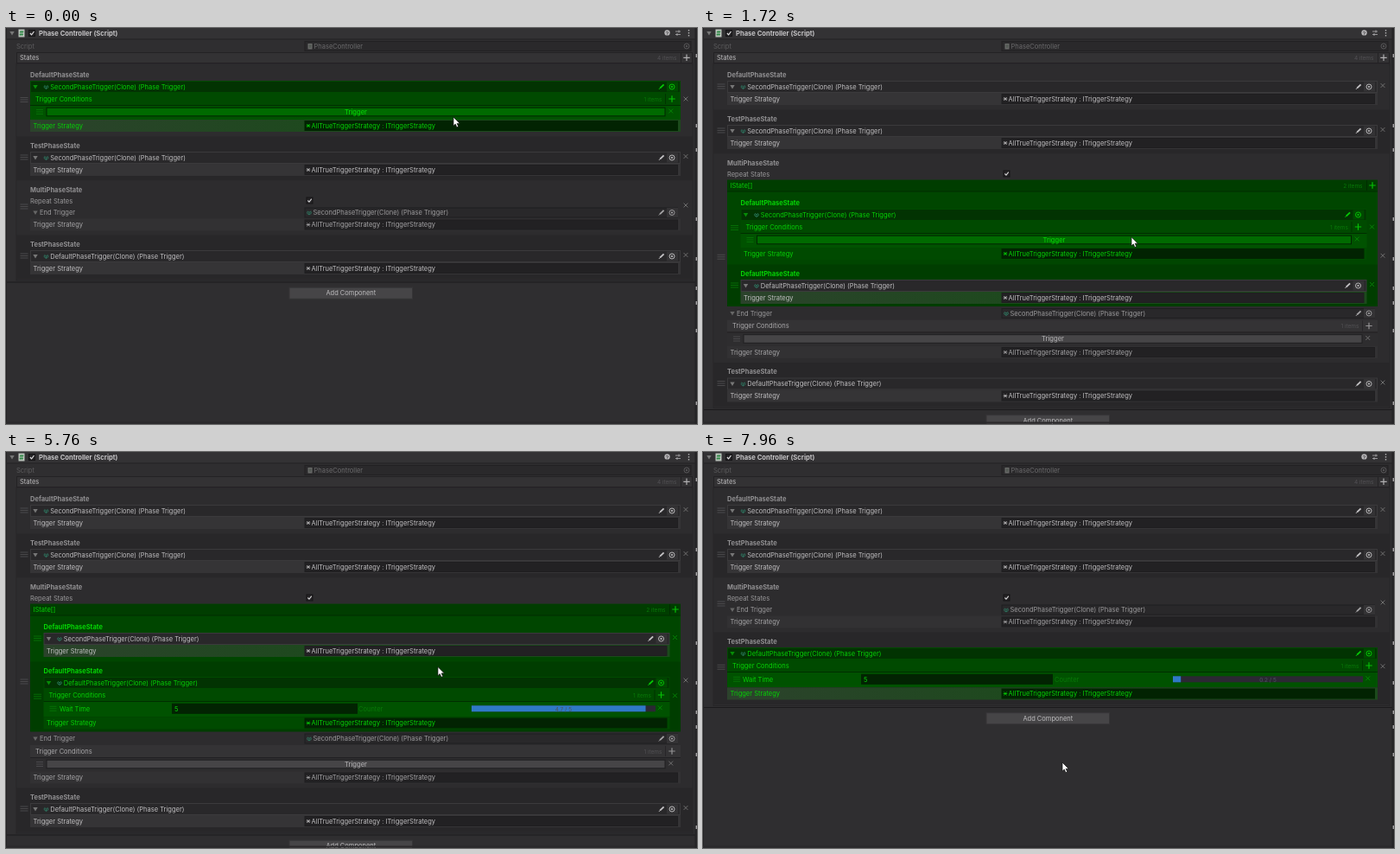
Recreate the animation shown at these times as an HTML page. Size 800 by 458 pixels, loop 8 s.

```html
<!DOCTYPE html>
<html lang="en">
<head>
<meta charset="utf-8">
<title>Phase Controller</title>
<style>
  html, body { margin: 0; width: 100%; height: 100%; overflow: hidden; background: #2f2e30; }
  #stage { display: block; width: 100vw; height: 100vh; }
  text { font-family: Inter, Roboto, sans-serif; font-size: 7.5px; }
</style>
</head>
<body>
<svg id="stage" viewBox="0 0 800 458"></svg>
<script>
const LOOP = 8000, STEP = 40, FADE = 100;
// Moments at which the running phase changes
const AT = { test: 400, multi: 1189, second: 2035, again: 5965, third: 6627, last: 7795 };
const RATE = 1.27;        // counter seconds per second
const TRIGGER = 31, WAIT = 32.5, LIST_PAD = 14.5;

const PLAIN = {
  text: '#c0bfc1', soft: '#9a999b', title: '#929193', dim: '#525154', row: '#29282a', rim: '#3b3a3c', edge: '#1f1e20',
  head: '#343335', list: '#2e2d2f', button: '#464547', field: '#222123', icon: '#c4c3c5', plus: '#949395', mark: '#777'
};
const GREEN = {
  text: '#06d006', soft: '#05b805', title: '#05d405', dim: '#087808', row: '#023302', rim: '#004a00', edge: '#012401',
  head: '#004a00', list: '#005200', button: '#006a00', field: '#022302', icon: '#06c806', plus: '#06c006', mark: '#078c07'
};

const clamp = v => Math.max(0, Math.min(1, v));
const ramp = (t, from) => clamp((t - from) / FADE);
const pulse = (t, on, off) => ramp(t, on) - ramp(t, off);

const rect = (x, y, w, h, fill, extra = '') =>
  `<rect x="${x}" y="${y}" width="${w}" height="${h}" fill="${fill}" ${extra}/>`;
const path = (d, stroke, width = 1, extra = 'fill="none"') =>
  `<path d="${d}" stroke="${stroke}" stroke-width="${width}" ${extra}/>`;
const text = (x, y, s, fill, extra = '') =>
  `<text x="${x}" y="${y + 2.9}" fill="${fill}" ${extra}>${s}</text>`;
const bold = (x, y, s, fill, extra = '') => text(x, y, s, fill, 'font-weight="700" ' + extra);
const small = (x, y, s, fill, anchor = 'end') =>
  text(x, y - .4, s, fill, `text-anchor="${anchor}" style="font-size:6.5px"`);
const clip = (y, h, body) => h <= 0 ? '' :
  `<svg x="0" y="${y}" width="800" height="${h}" viewBox="0 ${y} 800 ${h}">${body}</svg>`;
const box = (x, y, w, h, fill, edge) =>
  rect(x + .5, y + .5, w - 1, h - 1, fill, `stroke="${edge}" stroke-width="1"`);

const plus = (x, y, c) => path(`M${x - 3.7} ${y}h7.4M${x} ${y - 3.7}v7.4`, c, 1.2);
const cross = (x, y, c, r = 2.4) =>
  path(`M${x - r} ${y - r}l${2 * r} ${2 * r}m0 ${-2 * r}l${-2 * r} ${2 * r}`, c, .9);
const handle = (x, y, c, w = 9) => path(`M${x} ${y - 2.5}h${w}m${-w} 2.5h${w}m${-w} 2.5h${w}`, c, .8);
const fold = (x, y, c) => `<path d="M${x - 2.7} ${y - 2}h5.4l-2.7 4.4z" fill="${c}"/>`;
const star = (x, y, c) => path(`M${x - 2.3} ${y}h4.6M${x - 1.6} ${y - 2}l3.2 4M${x + 1.6} ${y - 2}l-3.2 4`, c, .8);
const gem = (x, y) => path(`M${x - 2} ${y - 1.6}l2 1.4l2 -1.4M${x} ${y - .2}v2.6M${x - 2.2} ${y - 1}v2l2.2 1.4l2.2 -1.4v-2`, '#2f8068', .8);
const pencil = (x, y, c) => path(`M${x - 1.9} ${y + 1.6}L${x + 2.6} ${y - 2.6}`, c, 1.9) +
  path(`M${x - 3.2} ${y + 3}l1.5 -1.5`, c, .9);
const target = (x, y, c) => `<circle cx="${x}" cy="${y}" r="3" fill="none" stroke="${c}" stroke-width=".9"/>` +
  `<circle cx="${x}" cy="${y}" r="1.1" fill="${c}"/>`;

const tools = (y, p, e) => rect(765 - e, y - 5.5, 13, 11, p.head) + pencil(759 - e, y, p.icon) + target(771 - e, y, p.icon);

function strategy(y, p, e, d, fill, label = p.text) {
  return rect(28 + d, y - 7, 753 - d - e, 14, fill) + text(31.5 + d, y, 'Trigger Strategy', label) +
    box(345.5, y - 6, 432.5 - e, 12, p.field, p.edge) + star(350, y, label) +
    text(353.5, y, 'AllTrueTriggerStrategy : ITriggerStrategy', label);
}

function waitRow(y, p, nested, time) {
  const [x1, x2, label, b1, b2] = nested ? [192, 407, 408, 539, 752] : [183, 405, 407, 544, 764];
  const v = Math.max(0, Math.min(5, time));
  return text(nested ? 62 : 46, y, 'Wait Time', p.text) + box(x1, y - 6, x2 - x1, 12, p.field, p.edge) +
    text(x1 + 3, y, '5', p.text) + text(label, y, 'Counter', p.dim) +
    rect(b1, y - 3.5, b2 - b1, 7, '#2b2833') + rect(b1, y - 3.5, (b2 - b1) * v / 5, 7, '#2f79c6') +
    small((b1 + b2) / 2, y + .4, v.toFixed(1) + ' / 5', '#4c5460', 'middle');
}

// Folding list of conditions; open runs from 0 to 1
function conditions(y, p, nested, open, time) {
  if (open <= 0) return '';
  const d = nested ? 15.5 : 0, e = nested ? 12.5 : 0, timed = time !== null;
  const size = timed ? WAIT : TRIGGER, w = 753 - d - e, mid = y + (timed ? 15.8 : 15);
  let s = rect(28 + d, y - 7, w, 14, p.head) + text(34 + d, y, 'Trigger Conditions', p.text) +
    small(759.5 - e, y, '1 items', p.dim) + path(`M${763.5 - e} ${y - 6}v12`, p.edge, .6) + plus(771 - e, y, p.plus) +
    rect(28 + d, y + 7, w, size - 14, p.list) + path(`M${28 + d} ${y + 7.5}h${w}`, p.edge, .8) +
    handle(35 + d, mid, p.dim, 8) + cross(769.7 - e, mid - 1, p.mark);
  s += timed ? waitRow(mid, p, nested, time)
    : box(46.5 + d, mid - 5.3, 717 - d - e, 10.6, p.button, p.edge) +
      text(405 + (d - e) / 2, mid, 'Trigger', p.text, 'text-anchor="middle" font-weight="500"');
  return clip(y - 7, size * open, `<g opacity="${nested ? 1 : open}">${s}</g>`);
}

const simpleHeight = s => 51 + s.open * (s.time === null ? TRIGGER : WAIT);

// One phase with a title, an object row, conditions and a strategy row
function simple(y, s) {
  const { name, ref, pal, nested, open, time, titlePal, band } = s;
  const d = nested ? 15.5 : 0, e = nested ? 12.5 : 0, h = simpleHeight(s), mid = y - 12 + h / 2;
  return bold(28 + d, y, name, titlePal.title) + handle(16.5 + d, mid, titlePal.dim) +
    cross(787 - e, mid - 1, titlePal.mark) +
    box(28 + d, y + 7, 753 - d - e, 14, pal.row, pal.rim) + fold(34 + d, y + 14, pal.mark) + gem(46.5 + d, y + 14) +
    text(51.3 + d, y + 14, ref + 'PhaseTrigger(Clone) (Phase Trigger)', pal.text) + tools(y + 14, pal, e) +
    conditions(y + 28, pal, nested, open, time) + strategy(y + h - 23, pal, e, d, band);
}

function multi(y, s) {
  const { open, pal, inner } = s, [a, b] = inner, ha = simpleHeight(a), hb = simpleHeight(b);
  const full = LIST_PAD + ha + hb, list = full * open, rows = TRIGGER * open, lit = pal === GREEN;
  const mid = y - 12 + (63 + list + rows) / 2, p = PLAIN, end = y + 26.5 + list, top = y + 19.5;
  const body = rect(28, top, 753, full - 1.5, lit ? '#004600' : p.list) +
    rect(28, y + 35.5 + ha, 753, hb, lit ? '#003d00' : '#2a292b') +
    rect(28, top, 753, 13, lit ? '#003d00' : p.head) + text(31.5, y + 26, 'IState[]', pal.text) +
    small(763.5, y + 26, '2 items', pal.dim) + path(`M768.5 ${y + 20}v12`, pal.edge, .6) + plus(775, y + 26, pal.plus) +
    path(`M28 ${y + 33}h753`, pal.edge, .8) + simple(y + 46, a) + simple(y + 46 + ha, b);
  return bold(28, y, 'MultiPhaseState', p.title) + handle(16.5, mid, p.dim) + cross(787, mid - 1.5, p.mark) +
    text(28, y + 12.7, 'Repeat States', p.soft) + box(347.5, y + 8.5, 8, 8, '#242325', '#161517') +
    path(`M349.4 ${y + 12.5}l1.6 1.7l2.8 -3.6`, '#d0cfd1', 1.1) +
    clip(top, Math.max(0, list - 1), body) +
    fold(34, end, '#666') + text(39, end, 'End Trigger', p.soft) +
    box(345.5, end - 6, 432.5, 12, '#29282a', p.edge) + gem(351, end) +
    text(355.5, end, 'SecondPhaseTrigger(Clone) (Phase Trigger)', p.soft) + tools(end, { ...p, icon: '#a4a3a5' }, 0) +
    conditions(end + 14.5, { ...p, text: '#a8a7a9' }, false, open, null) +
    strategy(end + 14 + rows, p, 0, 0, '#323133', '#a5a4a6');
}

function states(t) {
  const active = t < AT.test ? 0 : t < AT.multi ? 1 : t < AT.last ? 2 : 3;
  const second = pulse(t, AT.second, AT.again) + ramp(t, AT.third);
  const run = t >= AT.third || (t >= AT.second && t < AT.again) ? 1 : 0;
  const since = t >= AT.third ? AT.third : AT.second;
  const live = active === 2 ? GREEN : PLAIN;
  const outer = (i, name, ref, open, time = null) => ({
    name, ref, open, time, nested: false, pal: active === i ? GREEN : PLAIN, titlePal: PLAIN,
    band: active === i ? 'url(#glow)' : '#353436'
  });
  const nested = (i, ref, open, time) => ({
    name: 'DefaultPhaseState', ref, open, time, nested: true, titlePal: live, pal: run === i ? live : PLAIN,
    band: live === PLAIN ? '#353436' : run === i ? '#004a00' : 'url(#glow)'
  });
  return [
    outer(0, 'DefaultPhaseState', 'Second', 1 - ramp(t, AT.test)),
    outer(1, 'TestPhaseState', 'Second', pulse(t, AT.test, AT.multi)),
    { open: pulse(t, AT.multi, AT.last), pal: live,
      inner: [nested(0, 'Second', 1 - second, null), nested(1, 'Default', second, (t - since) / 1000 * RATE)] },
    outer(3, 'TestPhaseState', 'Default', ramp(t, AT.last), (t - AT.last) / 1000 * RATE)
  ];
}

const height = s => s.inner
  ? 63 + s.open * (LIST_PAD + TRIGGER + simpleHeight(s.inner[0]) + simpleHeight(s.inner[1])) : simpleHeight(s);
const total = list => list.reduce((sum, s) => sum + height(s), 0);

function header() {
  const p = PLAIN;
  return rect(0, 0, 800, 12.5, '#333234') + path('M0 13h800', '#242325') + fold(7, 6, '#777') +
    rect(14.5, 1.5, 7, 9, '#b9c2ba') + bold(15.6, 6, '#', '#23843c') +
    box(26, 2, 8, 8, '#232224', '#161517') + path('M27.9 6l1.7 1.8l2.9 -3.8', '#dddcde', 1.2) +
    bold(38, 6, 'Phase Controller (Script)', '#c6c5c7', 'style="font-size:7.6px"') +
    '<circle cx="765.5" cy="5.5" r="3.2" fill="#b5b4b6"/>' + small(765.5, 6, '?', '#29282a', 'middle') +
    path('M775 4h6M775 7.5h6M779 2.5v3M777 6v3', '#b0afb1', .8) +
    path('M790.5 2v1.4M790.5 5v1.4M790.5 8v1.4', '#b0afb1', 1.4) +
    text(12, 21, 'Script', '#5c5b5d') + box(345.5, 15, 448, 12, '#2a292b', '#222123') +
    rect(349.5, 18, 5, 6.5, '#696a69') + path('M350.8 20h2.6m-2.6 2h2.6', '#2d3a30', .7) +
    text(356.5, 21, 'PhaseController', '#6b6a6c') + target(788, 21, '#5c5b5d') +
    box(12, 28, 783, 13, '#333234', '#232224') + text(16, 34.3, 'States', p.text) +
    small(776.5, 34.3, '4 items', p.dim) + path('M781.5 29v11', '#232224') + plus(788, 34.3, '#b0afb1');
}

// Cursor tip: time, x, y
const MOVES = [[0, 518, 103], [350, 517, 99], [450, 517, 99], [1100, 512, 151], [1260, 512, 151], [1800, 495, 247.5],
  [2560, 495, 247.5], [3360, 500, 248.5], [6640, 500, 248.5], [6960, 459.5, 314.5], [7450, 430, 357], [7900, 416, 359], [LOOP, 416, 359]];

function cursor(t) {
  const i = MOVES.findIndex(m => m[0] > t), [t0, x0, y0] = MOVES[i - 1], [t1, x1, y1] = MOVES[i];
  const k = (t - t0) / (t1 - t0), f = k * k * (3 - 2 * k);
  return `<path transform="translate(${x0 + (x1 - x0) * f} ${y0 + (y1 - y0) * f})" fill="#fff" stroke="#111" ` +
    'stroke-width=".7" d="M0 0v10.2l2.3 -2.1l1.6 3.7l1.9 -.8l-1.6 -3.6h3.2z"/>';
}

const GLOW = '<defs><linearGradient id="glow" gradientUnits="userSpaceOnUse" x1="28" x2="400">' +
  '<stop stop-color="#2c422c"/><stop offset="1" stop-color="#1c4a1c"/></linearGradient></defs>';
const EDGE = [30, 111, 139, 219, 265, 299, 316, 348, 432]
  .map(y => rect(798.6, y, 1.4, 4, '#a5a4a6')).join('');

function draw(t) {
  const list = states(t), sum = total(list);
  let y = 43.5, s = GLOW + rect(0, 0, 800, 458, '#2f2e30') + header() +
    rect(12, 41, 783, sum + 4, '#2d2c2e', 'stroke="#252426" stroke-width=".8"');
  list.forEach((item, i) => {
    const h = height(item);
    s += rect(12.5, y, 782, h, i % 2 ? '#282729' : '#2d2c2e') + (item.inner ? multi : simple)(y + 10.5, item);
    y += h;
  });
  // The frame below the list follows the folding slightly late
  const foot = 59.5 + total(states(Math.max(0, t - 7)));
  s += path(`M0 ${foot - 12.5}h798`, '#1b1a1c') + box(327.5, foot - 6.8, 143.5, 14, '#464547', '#363537') +
    text(399.3, foot, 'Add Component', '#bebdbf', 'text-anchor="middle"') +
    path('M.5 0v458', '#232224') + path('M0 456.5h800', '#2a292b', 2) + rect(797.5, 0, 2.5, 458, '#252426') + EDGE + cursor(t);
  stage.innerHTML = s;
}

const stage = document.getElementById('stage');
let start = null, shown = -1;
function tick(now) {
  start ??= now;
  const t = Math.floor((now - start) % LOOP / STEP) * STEP;
  if (t !== shown) draw(shown = t);
  requestAnimationFrame(tick);
}
draw(0);
requestAnimationFrame(tick);
</script>
</body>
</html>
```
